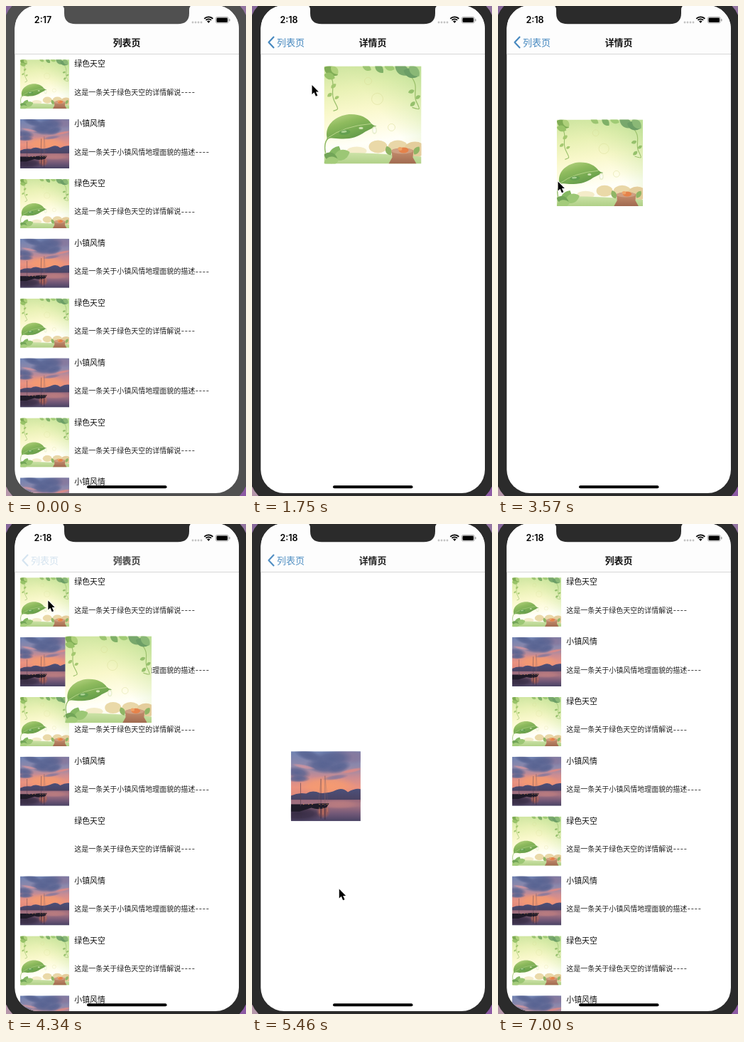
Write an HTML page with a canvas that moves like this. It is 338x688 px and loops after 7070 ms.

```html
<!DOCTYPE html>
<html lang="zh-CN">
<head>
<meta charset="utf-8">
<title>列表页</title>
<style>
  html, body { margin: 0; width: 100%; height: 100%; overflow: hidden; background: #2b2b2b; }
  canvas { display: block; width: 338px; height: 688px; }
</style>
</head>
<body>
<canvas id="stage"></canvas>
<script>
const W = 338, H = 688, LOOP = 7070, STEP = 70;
const MOVE = 620, FADE = 300, PRESS = 140;
const CJK = '"Noto Sans CJK SC", "Noto Sans CJK", "Noto Sans CJK JP", sans-serif';
const canvas = document.getElementById('stage');
const ctx = canvas.getContext('2d');
const dpr = window.devicePixelRatio || 1;
canvas.width = W * dpr;
canvas.height = H * dpr;

const trips = [
  { row: 0, open: 1050, close: 2306 },
  { row: 4, open: 3143, close: 4150 },
  { row: 5, open: 5180, close: 6160 }
];
// time, x, y of the pointer tip
const pointer = [
  [350, 190, 260], [840, 118, 116], [1470, 118, 116], [1750, 84.5, 111],
  [2030, 50, 44], [2310, 50, 44], [2520, 109.5, 309.5], [2870, 116, 440],
  [3290, 116, 440], [3570, 84.5, 246.5], [3850, 50, 45], [4200, 50, 45],
  [4830, 124, 540], [5040, 126.5, 547.5], [5390, 127, 540], [5880, 50.5, 43],
  [6230, 50.5, 43], [6790, 240, 700]
];

const clamp = v => Math.max(0, Math.min(1, v));
const mix = (a, b, k) => a + (b - a) * k;
const ease = v => { v = clamp(v); return v * v * (3 - 2 * v); };

function gradient(x0, y0, x1, y1, colors) {
  const g = ctx.createLinearGradient(x0, y0, x1, y1);
  colors.forEach(([at, c]) => g.addColorStop(at, c));
  return g;
}
function rect(x, y, w, h, fill) {
  ctx.fillStyle = fill;
  ctx.fillRect(x, y, w, h);
}
function round(x, y, w, h, r, fill) {
  ctx.beginPath();
  ctx.roundRect(x, y, w, h, r);
  ctx.fillStyle = fill;
  ctx.fill();
}
function oval(x, y, rx, ry, fill, turn = 0) {
  ctx.beginPath();
  ctx.ellipse(x, y, rx, ry, turn, 0, Math.PI * 2);
  ctx.fillStyle = fill;
  ctx.fill();
}
// An oval that fades out towards its rim.
function puff(x, y, rx, ry, rgb, turn = 0) {
  ctx.save();
  ctx.translate(x, y);
  ctx.rotate(turn);
  ctx.scale(rx, ry);
  const g = ctx.createRadialGradient(0, 0, 0, 0, 0, 1);
  g.addColorStop(0, `rgba(${rgb},.95)`);
  g.addColorStop(.55, `rgba(${rgb},.75)`);
  g.addColorStop(1, `rgba(${rgb},0)`);
  rect(-1, -1, 2, 2, g);
  ctx.restore();
}
function shape(d, fill) {
  ctx.fillStyle = fill;
  ctx.fill(new Path2D(d));
}
function line(d, color, width) {
  ctx.strokeStyle = color;
  ctx.lineWidth = width;
  ctx.stroke(new Path2D(d));
}
function text(s, x, y, font, color = '#000', align = 'left') {
  ctx.font = font;
  ctx.fillStyle = color;
  ctx.textAlign = align;
  ctx.fillText(s, x, y);
}
function leaf(x, y, size, turn, color) {
  ctx.save();
  ctx.translate(x, y);
  ctx.rotate(turn);
  ctx.scale(size, size);
  shape('M0 0C.25-.45.75-.4 1 0C.7.38.25.35 0 0Z', color);
  ctx.restore();
}

// Both pictures are drawn on a 137 unit square.
function greenSky() {
  rect(0, 0, 137, 137, gradient(30, 0, 50, 137, [[0, '#d0e6a2'], [.22, '#e8f1b4'], [.45, '#f9f8cb'], [.68, '#fffde6'], [.8, '#fffff8'], [1, '#fdfae8']]));
  rect(0, 0, 137, 137, gradient(137, 10, 75, 60, [[0, 'rgba(165,214,135,.6)'], [1, 'rgba(200,230,150,0)']]));
  for (const [x, y, r] of [[62, 21, 5], [75, 46, 8], [95, 86, 5], [62, 130, 5]]) {
    ctx.beginPath();
    ctx.arc(x, y, r, 0, 7);
    ctx.strokeStyle = 'rgba(215,220,150,.5)';
    ctx.lineWidth = 1;
    ctx.stroke();
  }
  line('M7 10C18 25 8 35 14 48S22 60 13 63M120 12C136 28 124 38 130 50S136 62 124 58', '#9cc06c', 1.3);
  leaf(0, 2, 22, .5, '#7fac55');
  leaf(0, 12, 16, .3, '#98c368');
  leaf(10, 0, 15, .9, '#aed07a');
  leaf(10, 31, 9, -.7, '#a4c870');
  leaf(11, 38, 8, 2.5, '#a4c870');
  leaf(15, 46, 7, -.5, '#a4c870');
  leaf(54, -1, 14, .5, '#9cc571');
  leaf(72, -2, 16, .8, '#7fb067');
  leaf(85, 0, 15, .3, '#a0cb75');
  leaf(100, -1, 24, .6, '#78a86c');
  leaf(112, 6, 22, .4, '#6c9e66');
  leaf(120, 0, 20, .8, '#8ab876');
  leaf(127, 34, 9, 2.8, '#95c06c');
  leaf(129, 46, 8, -.6, '#95c06c');
  leaf(128, 50, 9, 2.4, '#95c06c');
  oval(76, 113, 13, 9, '#ead9a8');
  oval(104, 114, 14, 10, '#e9d7a8');
  oval(128, 117, 15, 11, '#e4cd9c');
  oval(46, 119, 14, 6, '#f4ecc9');
  shape('M0 122Q50 120 137 127V137H0Z', gradient(0, 120, 0, 137, [[0, '#cfe4aa'], [1, '#b0d088']]));
  line('M6 101Q-1 108 2 122', '#8fb964', 1.5);
  shape('M4 100C1 84 14 71 32 68C48 66 61 72 66 80Q70 84 74 84Q66 88 58 92C48 99 39 102 27 102C17 103 10 99 4 103Z',
    gradient(24, 66, 36, 104, [[0, '#b3d17f'], [.35, '#8fbb5e'], [.75, '#73a850'], [1, '#64994a']]));
  line('M5 101Q28 84 66 81', '#b9d58c', 1);
  oval(29, 93, 8, 3.5, '#639f50', -.1);
  oval(28, 92, 4, 1.5, '#a9cf92', -.1);
  oval(52, 87, 3, 1.7, '#cfe2b2');
  oval(71, 90, 3.5, 5.5, '#e9efcf');
  oval(71, 90, 2, 3.5, '#fbfcf1');
  leaf(10, 137, 27, -1.15, '#85b863');
  leaf(14, 130, 24, -.4, '#9cc775');
  leaf(0, 124, 21, .4, '#72a558');
  leaf(0, 136, 21, -.2, '#a4cc7b');
  leaf(94, 125, 14, -2, '#8fb565');
  leaf(127, 124, 13, -1, '#8fb565');
  shape('M95 118Q111 111 126 118L125 128L130 137H91L96 128Z',
    gradient(0, 114, 0, 137, [[0, '#c59577'], [.5, '#b88163'], [1, '#a06a50']]));
  oval(110, 119, 15, 4, '#cf9f82');
  oval(112, 118, 7, 4, '#e5824a');
  oval(107, 116, 3, 2.5, '#efa468');
}

function townDusk() {
  rect(0, 0, 137, 100, gradient(0, 0, 0, 98, [[0, '#6f82b2'], [.3, '#8f88aa'], [.52, '#cb8c92'], [.72, '#ea9280'], [1, '#d98276']]));
  puff(70, 68, 60, 20, '246,155,112');
  const dark = '86,98,145', mauve = '136,120,156';
  puff(115, 10, 45, 16, mauve);
  puff(80, 15, 42, 18, dark, -.1);
  puff(62, 30, 34, 14, dark, .15);
  puff(95, 32, 24, 11, dark, -.3);
  puff(35, 8, 30, 11, dark, .3);
  puff(12, 42, 28, 12, dark, .15);
  puff(14, 54, 24, 7, dark);
  puff(88, 51, 26, 5, mauve, -.15);
  puff(120, 38, 24, 4, '222,138,134', -.2);
  puff(25, 30, 24, 4, '205,148,160', .2);
  shape('M0 87Q15 80 30 83Q42 75 57 82Q75 83 89 76Q101 70 112 80Q126 72 137 74V98H0Z',
    gradient(0, 74, 0, 98, [[0, '#4c5079'], [1, '#4a415f']]));
  rect(0, 95, 137, 42, gradient(0, 95, 0, 137, [[0, '#9d6c7c'], [.3, '#a07080'], [.65, '#725877'], [1, '#494364']]));
  puff(95, 104, 45, 9, '186,124,128');
  puff(14, 122, 55, 16, '52,42,66');
  puff(64, 118, 14, 14, '165,92,84');
  shape('M0 104H30L43 103L55 102H75L70 110Q55 116 40 111L17 118H0Z', '#1f1b28');
  line('M19 62V107M59 54V107', '#5a4250', .9);
  line('M67 48V107', '#8a6568', .9);
  line('M67 48L73 104M59 54L54 103', '#85636b', .4);
  line('M59 112V132M67 112V134M20 118V131', '#3c3045', 1.4);
  line('M56 110V122M63 110V124M72 110V119', '#c98068', 1);
  for (const x of [25, 35, 42, 56, 63, 71]) oval(x, 104, 1.1, 1, '#e0965f');
}

function picture(kind, x, y, size) {
  ctx.save();
  ctx.beginPath();
  ctx.rect(x, y, size, size);
  ctx.clip();
  ctx.translate(x, y);
  ctx.scale(size / 137, size / 137);
  kind ? townDusk() : greenSky();
  ctx.restore();
}

const thumbTop = row => 75.2 + row * 83.87;

function list(hidden) {
  for (let row = 0; row < 8; row++) {
    const top = thumbTop(row), town = row % 2;
    if (row !== hidden) picture(town, 20, top, 69);
    text(town ? '小镇风情' : '绿色天空', 96.3, top + 6, '10.9px ' + CJK, '#111');
    const detail = town ? '这是一条关于小镇风情地理面貌的描述' : '这是一条关于绿色天空的详情解说';
    text(detail, 96.3, top + 45.7, '10px ' + CJK, '#222');
    for (let i = 0; i < 4; i++) text('-', 98.8 + detail.length * 10 + i * 5, top + 45.2, '12px ' + CJK, '#222', 'center');
  }
}

function navBar(p, pressed) {
  rect(0, 0, W, 67, '#fdfdfd');
  rect(0, 67, W, 1, '#d6d6d6');
  const bold = '600 12.9px ' + CJK;
  ctx.globalAlpha = 1 - p;
  text('列表页', 170, 51, bold, '#111', 'center');
  ctx.globalAlpha = p;
  text('详情页', 170, 51, bold, '#111', 'center');
  ctx.globalAlpha = pressed ? Math.min(.22, p) : p;
  line('M31 43L23.5 51L31 59', '#4688bf', 2.1);
  text('列表页', 35, 51, '13px ' + CJK, '#4688bf');
  ctx.globalAlpha = 1;
}

function statusBar(t) {
  text(t < 700 ? '2:17' : '2:18', 52, 20, '600 12.5px Inter, sans-serif', '#000', 'center');
  for (let i = 0; i < 4; i++) oval(263 + i * 4, 23, 1.4, 1.4, '#c4c4c4');
  for (const r of [8.2, 5.2]) {
    ctx.beginPath();
    ctx.arc(285.3, 23.5, r, -Math.PI * .76, -Math.PI * .24);
    ctx.strokeStyle = '#000';
    ctx.lineWidth = 1.8;
    ctx.stroke();
  }
  shape('M285.3 24L283 21.3Q285.3 19.5 287.6 21.3Z', '#000');
  ctx.beginPath();
  ctx.roundRect(295.3, 15.3, 18, 8.8, 2.5);
  ctx.strokeStyle = '#999';
  ctx.lineWidth = .8;
  ctx.stroke();
  round(296.5, 16.5, 15.6, 6.4, 1.4, '#000');
  round(314.2, 18, 1.3, 3.5, .7, '#999');
}

function cursor(t) {
  const i = pointer.findIndex(p => p[0] > t);
  if (i < 1) return;
  const [t0, x0, y0] = pointer[i - 1], [t1, x1, y1] = pointer[i];
  const k = ease((t - t0) / (t1 - t0));
  ctx.save();
  ctx.translate(mix(x0, x1, k), mix(y0, y1, k));
  const arrow = 'M0 0V13L3 10.3L5.4 15.8L7.8 14.8L5.4 9.5H9.3Z';
  line(arrow, '#fff', 1.8);
  shape(arrow, '#000');
  ctx.restore();
}

const bezel = t => t < 560 ? '#505050' : '#2b2b2b';

function phone(t) {
  rect(0, 0, W, H, gradient(0, 0, W, H, [[0, '#86679b'], [.5, '#a78aa8'], [1, '#8c59a4']]));
  rect(0, H - 20, 20, 20, '#b596aa');
  round(-3, -12, 344, 711, 40, bezel(t));
}

const screen = new Path2D();
screen.roundRect(12.3, -1, 315.7, 685, 33);
const notch = 'M75 -2Q82 -2 82 6V10Q82 25.3 98 25.3H242Q258 25.3 258 10V6Q258 -2 265 -2Z';

function draw(t) {
  ctx.setTransform(dpr, 0, 0, dpr, 0, 0);
  ctx.textBaseline = 'middle';
  ctx.lineJoin = 'round';
  phone(t);
  ctx.save();
  ctx.clip(screen);
  rect(0, 0, W, H, '#fff');

  const trip = trips.find(q => t >= q.open && t < q.close + MOVE);
  let nav = 0, pressed = false;
  if (!trip) list(-1);
  else {
    const back = t >= trip.close;
    const since = t - (back ? trip.close : trip.open);
    const k = back ? 1 - ease(since / MOVE) : ease(since / MOVE);
    nav = clamp(since / FADE);
    if (back) nav = 1 - nav;
    pressed = t >= trip.close - PRESS;
    if (back) list(trip.row);
    picture(trip.row % 2, mix(20, 101.5, k), mix(thumbTop(trip.row), 84.4, k), mix(69, 137, k));
  }
  navBar(nav, pressed);
  statusBar(t);
  round(114, 673.2, 112.5, 4, 2, '#000');
  ctx.restore();

  shape(notch, bezel(t));
  cursor(t);
}

const start = performance.now();
function tick() {
  const t = (performance.now() - start) % LOOP;
  draw(Math.floor(t / STEP) * STEP);
  requestAnimationFrame(tick);
}
tick();
</script>
</body>
</html>
```
